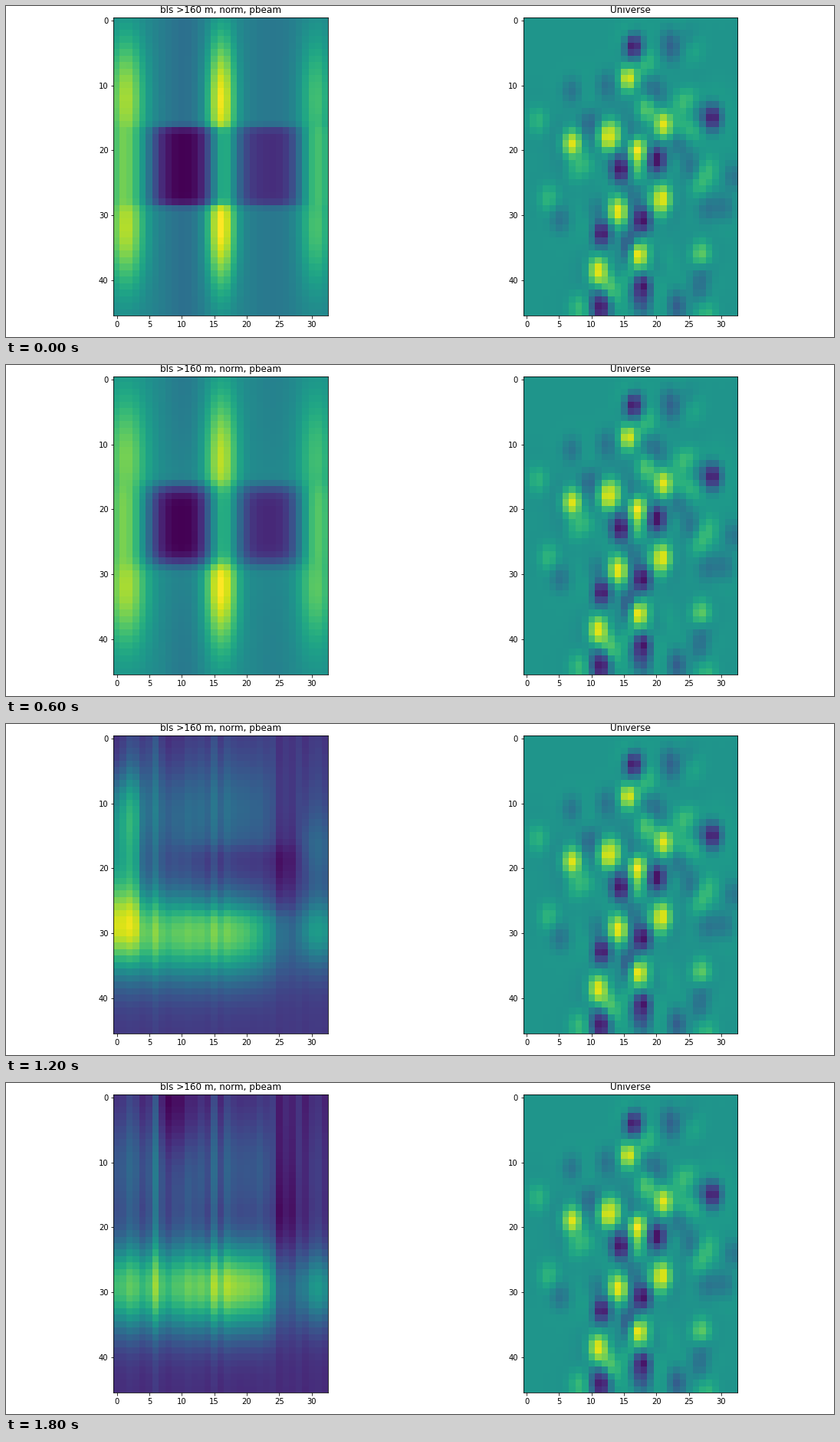
These frames come from a looping animation (1080 px wide and 432 px high, 2 s). A matplotlib script:

```python
import numpy as np
import matplotlib.pyplot as plt
from matplotlib.animation import FuncAnimation

W, H, DPI = 1080, 432, 72
COLS, ROWS = 33, 46
FRAMES, INTERVAL = 10, 200
c, r = np.meshgrid(np.arange(COLS), np.arange(ROWS))
rng = np.random.default_rng(4)


def bell(x, mid, width):
    return np.exp(-0.5 * ((x - mid) / width) ** 2)


def plateau(x, mid, half, power=4):
    return np.exp(-(np.abs(x - mid) / half) ** power)


def step(x, width=0.4):
    return 1 / (1 + np.exp(-x / width))


def lerp(a, b, u):
    return a + (b - a) * u


def source(col, row):
    """A bright point with a faint dark ring."""
    q = ((c - col) / 1.35) ** 2 + ((r - row) / 1.9) ** 2
    return (1 - q / 3) * np.exp(-q / 2)


VOIDS = [(16.4, 4), (28.5, 15), (14.4, 23), (20, 21.5),
         (17.7, 30.8), (11.5, 32.8), (17.8, 41), (11.4, 44.3)]
PEAKS = [(15.6, 9), (21, 16), (12.5, 18), (7, 19), (17, 20),
         (20.8, 27.5), (14.1, 29.4), (17.2, 36.2), (11, 38.6)]


def sky():
    field = np.full((ROWS, COLS), .52)
    for i in range(70):
        spot = source(rng.normal(17, 8), rng.uniform(0, ROWS))
        field += .13 * (-1) ** i * spot
    near_key = sum(source(*p).clip(0) for p in VOIDS + PEAKS).clip(0, 1)
    field = lerp(field, .52, near_key)
    field -= .45 * sum(source(*p) for p in VOIDS)
    field += .43 * sum(source(*p) for p in PEAKS)
    return field


def lobes(k):
    """Three bright stripes around two dark wells; k rounds the wells off."""
    mid = plateau(r, 22.5, 6.2, lerp(14, 4, k))
    upper = lerp(1, .78, k) * bell(r, 12, 7)
    rows = (1 - mid) * (upper + 1.05 * bell(r, 32, 6.5)) + .48 * mid
    stripes = lerp(.53, .48, k) * bell(c, 16.1, lerp(1.5, 1.75, k))
    stripes += lerp(.42, .35, k) * bell(c, 1.5, lerp(2, 2.3, k))
    stripes += .25 * bell(c, 30.6, lerp(1.7, 1.9, k))
    wells = lerp(.37, .5, k) * plateau(c, lerp(10.4, 9.8, k), 5.2, 4 - k)
    wells += lerp(.27, .39, k) * plateau(c, 23.3, 5.1, 4 - k)
    sides = .14 * (bell(c, 1, 1.7) + bell(c, 31, 1.6))
    troughs = .08 * bell(c, 10.3, 2.2) + .05 * bell(c, 24, 2.5)
    return (lerp(.45, .5, k) + stripes * rows + mid * (sides - wells)
            - troughs * (1 - k * bell(r, 22, 10)))


streak = rng.normal(0, .03, COLS)
streak[6] = .15


def merged(n):
    """The wells join, then give way to one bright horizontal band."""
    u = 1 - .25 ** n
    near = step(lerp(20, 23.7, u) - c, lerp(4, .7, u))
    left = .4 * plateau(n, 0, 1.4)
    field = lerp(.28, .13, u) + lerp(.3, .16, u) * bell(r, 11, 6.2) * lerp(.3, 1, near)

    band = .58 * bell(r, lerp(33, 29.2, u), 5)
    field += band * lerp(.4 * u, 1, near)
    field += .15 * u ** 5 * bell(c, 18, 3.5) * bell(r, 29, 5)
    field -= lerp(.36, .02, u) * plateau(c, 18.5, 10) * plateau(r, 21.8, 5.3, 6)

    field += left * step(3.6 - c) * plateau(r, 19, 13)
    field -= .4 * left * bell(c, 0, .8) * bell(r, 9, 7)
    edge = bell(r, 17.5, 4) * (1 - u ** 4) + bell(r, 29.5, 3.5)
    field += lerp(.3, .17, u) * step(c - 28.6) * edge

    field -= .1 * u * plateau(c, 26, 2.3) * bell(r, 16, 9)
    field -= .15 * u ** 3 * bell(c, 9.5, 2.3) * bell(r, 3, 7)
    return field + u ** 2 * streak * lerp(.25, 1, step(35 - r, 2))


def beam(i):
    return lobes(i / 4) if i < 5 else merged(i - 5)


def panel(left, title, field):
    height = 389.2
    width = height * COLS / ROWS
    ax = fig.add_axes([left / W, 27.8 / H, width / W, height / H])
    image = ax.imshow(field, cmap="viridis", vmin=0, vmax=1,
                      interpolation="nearest", aspect="auto")
    ax.set_xticks(range(0, 31, 5))
    ax.set_yticks(range(0, 41, 10))
    ax.set_title(title, fontsize=12)
    return image


plt.rcParams.update({"font.family": "DejaVu Sans", "font.size": 10})
fig = plt.figure(figsize=(W / DPI, H / DPI), dpi=DPI, facecolor="white")
beam_image = panel(140.45, "bls >160 m, norm, pbeam", beam(0))
panel(674.8, "Universe", sky())


def update(i):
    beam_image.set_data(beam(i))
    return [beam_image]


anim = FuncAnimation(fig, update, frames=FRAMES, interval=INTERVAL,
                     repeat=True, repeat_delay=0)
plt.show()
```
